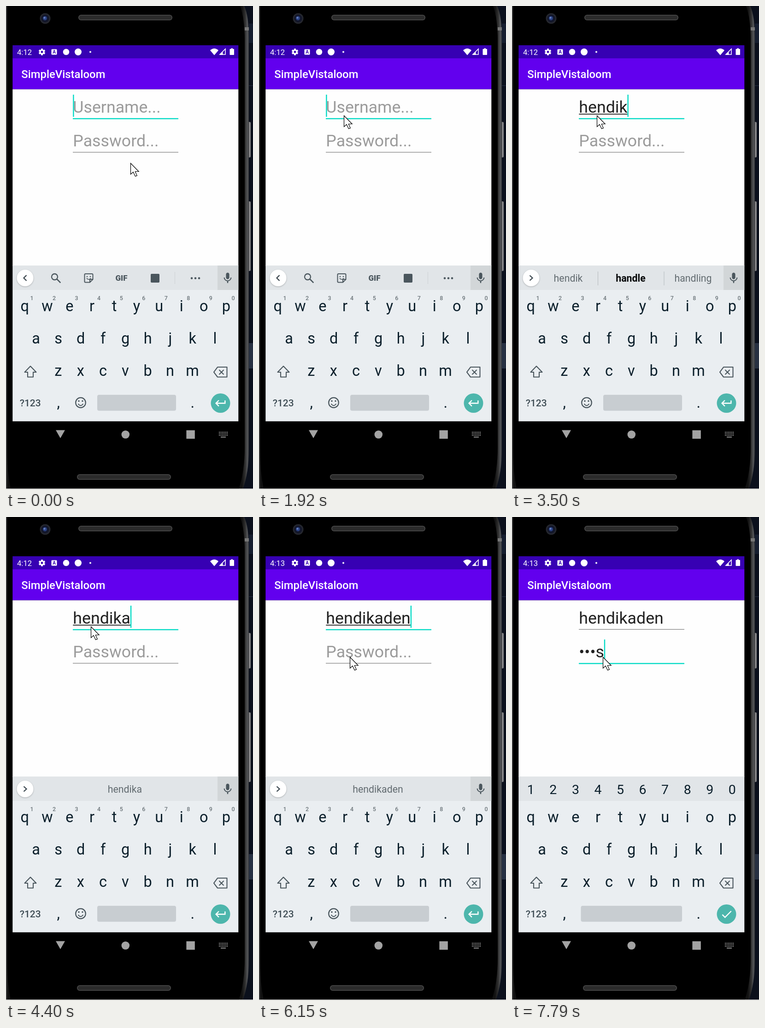
An HTML page with a canvas for the animation above (8000 ms loop, 536 px wide and 1046 px high).

```html
<!DOCTYPE html>
<html lang="en">
<head>
<meta charset="utf-8">
<title>Login screen</title>
<style>
html, body { margin: 0; width: 100%; height: 100%; overflow: hidden; background: #000; }
canvas { display: block; width: 536px; height: 1046px; }
</style>
</head>
<body>
<canvas id="stage" width="536" height="1046"></canvas>
<script>
const ctx = document.getElementById('stage').getContext('2d');
const LOOP = 8000;
const FOCUS = 6280, DIGITS = 6400;
const DP = 1.191, LEFT = 14.3, WIDTH = 490;
const TEAL = '#03dac5', INK = '#0b1f2b', ICON = '#4a565d', NAV = '#a3a3a3';
const NAME = 'hendikaden', SECRET = 'news';

const nameTimes = [2580, 2700, 2950, 3230, 3350, 3500, 4400, 4520, 4650, 5210];
const secretTimes = [7170, 7290, 7540, 7790];
const caretOff = [[530, 1060], [1490, 1920], [3870, 4400], [5610, 6150], [6920, 7170]];
const pointer = [
  [0, 270, 340], [790, 252, 268], [910, 230, 214], [1060, 227, 176], [1210, 208, 205],
  [1490, 198, 219], [1640, 184, 237], [5880, 190, 262], [6030, 197, 303]
];
const hints = [
  ['he', 'have'], ['her', 'here'], ['he', 'hence'],
  ['hand', 'handles'], ['handy', 'handles'], ['handle', 'handling']
];

// icons on a 24 unit grid
const icons = {
  mic: 'M12 14c1.66 0 3-1.34 3-3V5c0-1.66-1.34-3-3-3S9 3.34 9 5v6c0 1.66 1.34 3 3 3zm5.3-3c0 3-2.54 5.1-5.3 5.1S6.7 14 6.7 11H5c0 3.41 2.72 6.23 6 6.72V21h2v-3.28c3.28-.48 6-3.3 6-6.72z',
  enter: 'M19 7v4H5.83l3.58-3.59L8 6l-6 6 6 6 1.41-1.41L5.83 13H21V7z',
  check: 'M9 16.17L4.83 12l-1.42 1.41L9 19 21 7l-1.41-1.41z'
};

const count = (times, t) => times.filter(x => x <= t).length;

function rect(x, y, w, h, color) {
  ctx.fillStyle = color;
  ctx.fillRect(x, y, w, h);
}

const band = (y, end, color) => rect(LEFT, y, WIDTH, end - y, color);

function round(x, y, w, h, r, color) {
  ctx.fillStyle = color;
  ctx.beginPath();
  ctx.roundRect(x, y, w, h, r);
  ctx.fill();
}

function disc(x, y, r, color) {
  ctx.fillStyle = color;
  ctx.beginPath();
  ctx.arc(x, y, r, 0, 7);
  ctx.fill();
}

function ring(x, y, r, color, width) {
  ctx.strokeStyle = color;
  ctx.lineWidth = width;
  ctx.beginPath();
  ctx.arc(x, y, r, 0, 7);
  ctx.stroke();
}

function fill(d, color) {
  ctx.fillStyle = color;
  ctx.fill(new Path2D(d));
}

function line(d, color, width) {
  ctx.strokeStyle = color;
  ctx.lineWidth = width;
  ctx.stroke(new Path2D(d));
}

function icon(name, x, y, color) {
  ctx.save();
  ctx.translate(x, y);
  ctx.scale(DP, DP);
  ctx.translate(-12, -12);
  fill(icons[name], color);
  ctx.restore();
}

function text(s, x, y, size, color, weight = 400, align = 'left') {
  ctx.font = `${weight} ${size}px Roboto, sans-serif`;
  ctx.fillStyle = color;
  ctx.textAlign = align;
  ctx.fillText(s, x, y);
  return ctx.measureText(s).width;
}

const label = (s, x, y, size, color, weight) => text(s, x, y, size, color, weight, 'center');

function speaker(x, y) {
  round(x, y, 204, 12, 6, '#4c4c4c');
  round(x + 1.5, y + 1.5, 201, 9, 4.5, '#2b2b2b');
}

function phone() {
  rect(0, 0, 536, 1046, '#0b101c');
  rect(527, 38, 9, 42, '#161e2f');
  rect(527, 172, 9, 1, '#263044');
  rect(527, 730, 9, 55, '#283142');

  // side keys
  for (const [y, h] of [[251, 77], [423, 151]]) {
    round(524, y, 7, h, 2, '#77777a');
    rect(529, y + 2, 1, h - 4, '#a0a0a2');
  }

  const edge = ctx.createLinearGradient(512, 0, 528, 0);
  edge.addColorStop(0, '#111');
  edge.addColorStop(0.45, '#303030');
  edge.addColorStop(0.75, '#55575a');
  edge.addColorStop(1, '#2a2b2d');
  fill('M0 0H517Q527 22 527 70V960Q527 1010 514 1046H0Z', edge);
  fill('M2 0H508Q518 28 518 75V955Q518 1008 505 1046H10Q2 1005 2 955Z', '#000');
  rect(0, 0, 1, 1046, '#2b2b2b');
  rect(1, 0, 1, 1046, '#555');
  rect(518, 46, 9, 7, '#777');
  rect(0, 1045, 536, 1, '#d8d8d8');

  disc(85, 27, 11.5, '#25272e');
  disc(85, 27, 8.5, '#12162a');
  disc(84.5, 26.5, 4.5, '#2a4182');
  disc(83.5, 25.5, 2, '#6a82bd');
  speaker(157, 19);
  speaker(154, 1014);
}

function gear(x, y) {
  ctx.save();
  ctx.translate(x, y);
  for (let i = 0; i < 6; i++) {
    rect(-2, -7.2, 4, 4, '#fff');
    ctx.rotate(Math.PI / 3);
  }
  ctx.restore();
  disc(x, y, 5.4, '#fff');
  disc(x, y, 2.4, '#3700b3');
}

function bars(t) {
  band(85, 114, '#3700b3');
  band(113.3, 180.4, '#6200ee');
  text(t < 5210 ? '4:12' : '4:13', 24, 105.5, 14 * DP, '#fff');
  gear(78, 99.5);
  round(98.5, 93.5, 12, 12, 1.5, '#fff');
  label('A', 104.5, 103, 10, '#3700b3', 700);
  disc(130.5, 99.5, 6.8, '#fff');
  disc(156.5, 99.5, 7.5, '#fff');
  disc(183, 99.5, 2, '#fff');
  fill('M443 96Q452 88 461 96L452 106.5Z', '#fff');
  line('M464 105H476V93Z', '#fff', 1.6);
  fill('M464 106L470.5 99.5V106Z', '#fff');
  round(485.5, 93, 9.5, 13, 1, '#fff');
  rect(488.5, 91.5, 3.5, 2, '#fff');
  text('SimpleVistaloom', 33.3, 156, 20 * DP, '#fff', 500);
}

function field(value, hint, base, focused, caret, composing) {
  const size = 30 * DP;
  const w = value ? text(value, 145.3, base, size, '#212121') : 0;
  if (!value) text(hint, 145.3, base, size, '#9b9b9b');
  if (composing && value) rect(145.3, base + 2.8, w, 1.8, '#212121');
  if (focused) rect(145, base + 12.3, 229, 2 * DP, TEAL);
  else rect(145, base + 12.3, 229, DP, '#7c7c7c');
  if (focused && caret) rect(145.2 + w, base - 38.5, 2 * DP, 48, TEAL);
}

function form(t) {
  band(180.4, 563, '#fefefe');
  const caret = !caretOff.some(([a, b]) => t >= a && t < b);
  const onName = t < FOCUS;
  const n = count(secretTimes, t);
  const secret = n ? '\u2022'.repeat(n - 1) + SECRET[n - 1] : '';
  field(NAME.slice(0, count(nameTimes, t)), 'Username...', 230.5, onName, caret, onName);
  field(secret, 'Password...', 303.8, !onName, caret, false);
}

function tools() {
  ring(105.5, 586.5, 6.5, ICON, 2.3);
  line('M110 591L118.3 599.3', ICON, 2.6);
  line('M172.5 580H186.5Q188.5 580 188.5 582V592L182 598.5H172.5Q170.5 598.5 170.5 596.5V582Q170.5 580 172.5 580ZM188 592H182V598', ICON, 2);
  line('M175 589.5Q179.5 595 184 589.5', ICON, 1.7);
  disc(176, 586, 1.3, ICON);
  disc(183, 586, 1.3, ICON);
  label('GIF', 250.5, 595, 17, ICON, 900);
  round(314, 580, 19, 19, 2, ICON);
  rect(366, 576, 1, 26, '#ccd0d3');
  for (const x of [403, 411, 419]) disc(x, 589.5, 2.3, ICON);
}

function suggestions(n) {
  const typed = NAME.slice(0, n);
  const words = hints[n - 1];
  if (!words) return label(typed, 258, 597, 21.3, '#626b70');
  label(typed, 122, 597, 21.3, '#626b70');
  label(words[0], 257.5, 597, 21.3, '#050708', 700);
  label(words[1], 393, 597, 21.3, '#626b70');
  rect(186, 575, 1, 30, '#b4babd');
  rect(329.5, 575, 1, 30, '#b4babd');
}

function strip(n) {
  rect(459, 562, LEFT + WIDTH - 459, 53, '#d2d6d8');
  icon('mic', 481, 589.3, ICON);
  ctx.save();
  ctx.shadowColor = 'rgba(0,0,0,.25)';
  ctx.shadowBlur = 3;
  ctx.shadowOffsetY = 1;
  disc(41.5, 589, 18, '#fff');
  ctx.restore();
  line(n ? 'M38.5 583.5L44.5 589L38.5 594.5' : 'M44.5 583L38.5 589L44.5 595', '#36424a', 2.2);
  n ? suggestions(n) : tools();
}

function keyRow(keys, x, y, size = 32.5) {
  [...keys].forEach((k, i) => label(k, x + i * 48.55, y, size, INK));
}

function keyboard(t) {
  const digits = t >= DIGITS;
  band(562, 615, '#e1e5e8');
  band(615, 899.4, '#eaeef1');
  if (digits) {
    keyRow('1234567890', 40.8, 600, 28.5);
  } else {
    strip(count(nameTimes, t));
    for (let i = 0; i < 10; i++) label((i + 1) % 10, 56 + i * 48.55, 637, 12.5, '#6d767b', 500);
  }
  keyRow('qwertyuiop', 40.8, 661);
  keyRow('asdfghjkl', 65, 731);
  keyRow('zxcvbnm', 113.3, 801);
  label('?123', 52.7, 867, 21, '#3f4d55', 500);
  label(',', 113.6, 870, 32.5, INK);
  label('.', 404.9, 870, 32.5, INK);

  ctx.lineJoin = 'round';
  line('M53 780L65.5 793H59V803.5H47V793H40.5Z', ICON, 2.1);
  line('M459 782H479.5V803.5H459L451 792.8ZM462.5 788L472.5 798M472.5 788L462.5 798', ICON, 2.1);
  ctx.lineJoin = 'miter';

  const left = digits ? 149.5 : 198;
  round(left, 842, 369 - left, 34.5, 4, '#c8cdd1');
  if (!digits) {
    ring(162, 859, 10.8, ICON, 2.2);
    disc(158, 855.5, 1.7, ICON);
    disc(166, 855.5, 1.7, ICON);
    line('M156.5 861.5Q162 869 167.5 861.5', ICON, 2);
  }
  disc(465.5, 860, 21, '#4db6ac');
  icon(digits ? 'check' : 'enter', 465.8, 860.3, '#fff');
}

function navBar() {
  fill('M108 918.5H128L118 936Z', NAV);
  disc(259.3, 928, 8.8, NAV);
  rect(391.4, 918.8, 18.4, 18.4, NAV);
  for (let i = 0; i < 18; i++) rect(462 + (i % 6) * 3.4, 922 + Math.floor(i / 6) * 3.4, 2, 2, '#8f8f8f');
  rect(466, 932.6, 11, 2, '#8f8f8f');
}

function arrow(t) {
  const [, x, y] = pointer[count(pointer.map(p => p[0]), t) - 1];
  ctx.save();
  ctx.translate(x + 0.5, y + 0.5);
  const d = 'M0 0V24L5.5 19L10 28.3L13.8 26.8L9.8 18H17.6Z';
  fill(d, '#fff');
  line(d, '#000', 1.2);
  ctx.restore();
}

function draw(t) {
  phone();
  bars(t);
  form(t);
  keyboard(t);
  navBar();
  arrow(t);
}

const start = performance.now();
function tick() {
  draw((performance.now() - start) % LOOP);
  requestAnimationFrame(tick);
}
tick();
</script>
</body>
</html>
```
